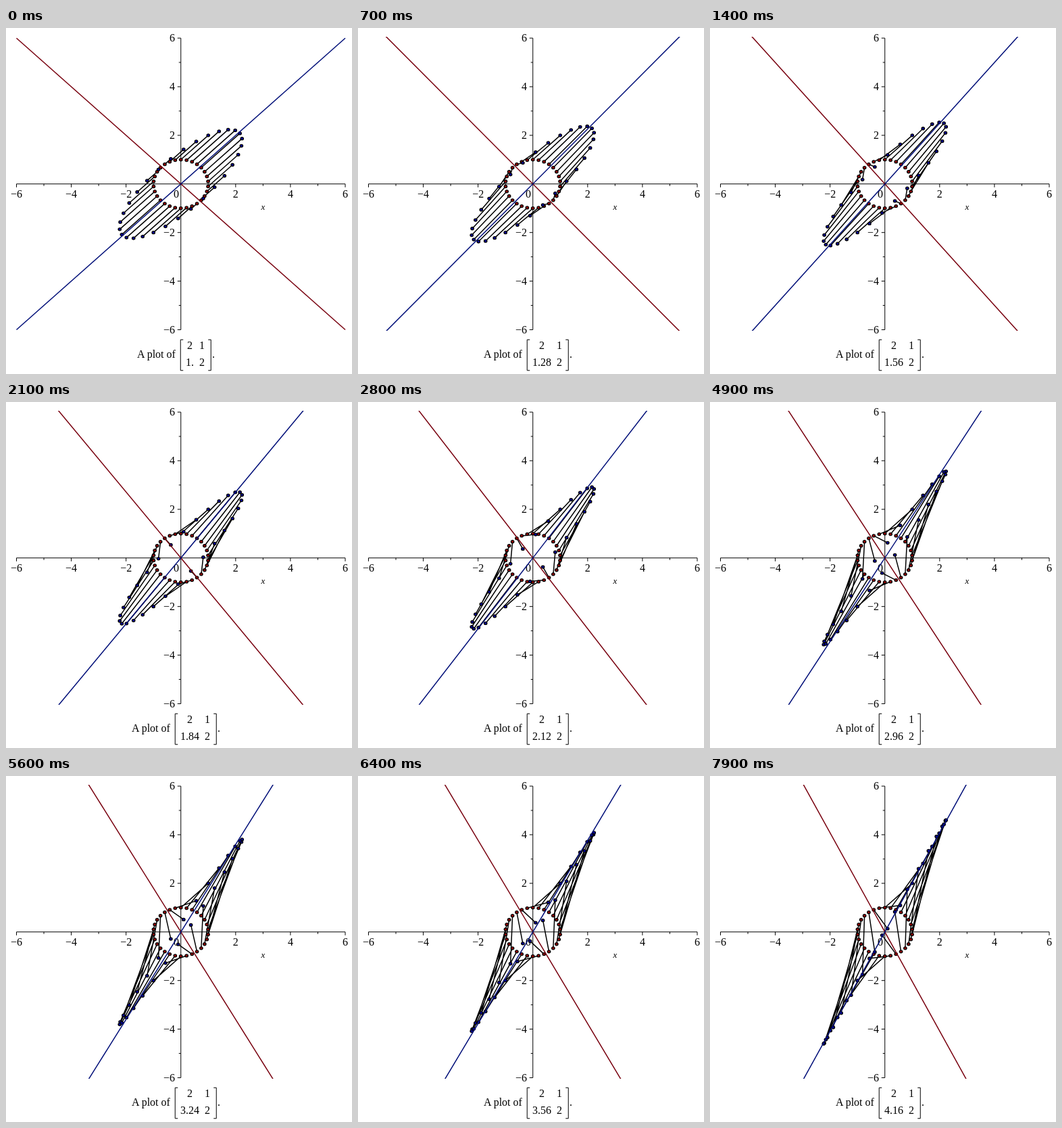
Recreate the animation shown at these times as an HTML page. Size 512x512 px, loop 8000 ms.

```html
<!DOCTYPE html>
<html lang="en">
<head>
<meta charset="utf-8">
<title>Matrix plot</title>
<style>
  html, body { margin: 0; width: 100%; height: 100%; overflow: hidden; background: #fff; }
  svg { display: block; width: 100vw; height: 100vh; }
  text { font: 16px "Liberation Serif", "Times New Roman", serif; fill: #000; }
  .mid { text-anchor: middle; }
  .end { text-anchor: end; }
  #name { font-size: 13px; font-style: italic; }
  #axes path, .bracket { fill: none; stroke: #000; stroke-width: 1; }
  #links { fill: none; stroke: #000; stroke-width: 1.5; }
  #dots ellipse { stroke: #000; stroke-width: 1.3; }
  .unit { fill: #a00000; }
  .image { fill: #0000a0; }
  #rays line { stroke-width: 1.5; }
</style>
</head>
<body>
<svg viewBox="0 0 512 512">
  <clipPath id="view"><rect x="15" y="13" width="488" height="435"/></clipPath>
  <g id="axes"><path id="ticks"/><text id="name" class="mid" x="380.5" y="269">x</text></g>
  <g clip-path="url(#view)">
    <path id="links"/>
    <g id="dots"></g>
    <g id="rays"><line id="red" stroke="#78000e"/><line id="blue" stroke="#000e78"/></g>
  </g>
  <text id="lead" y="487.5">A plot of</text>
  <path id="left" class="bracket" d="M4.25 461.25H.25V506.75H4.25"/>
  <text class="mid" x="272" y="475">2</text>
  <text id="entry" class="mid" x="272" y="500"></text>
  <text id="top" class="mid" y="475">1</text>
  <text id="bottom" class="mid" y="500">2</text>
  <path id="right" class="bracket" d="M-4.75 461.25H-.75V506.75H-4.75"/>
  <text id="stop" y="487.5">.</text>
</svg>
<script>
const $ = id => document.getElementById(id);
const px = x => 258.75 + 40.54 * x;
const py = y => 230.75 - 35.96 * y;

function set(el, attrs) {
  for (const key in attrs) el.setAttribute(key, attrs[key]);
}

function add(parent, tag, attrs, text = "") {
  const el = document.createElementNS("http://www.w3.org/2000/svg", tag);
  set(el, attrs);
  el.textContent = text;
  parent.append(el);
  return el;
}

function drawAxes() {
  let d = `M${px(-6)} ${py(0)}H${px(6)}M${px(0)} ${py(6)}V${py(-6)}`;
  for (let v = -6; v <= 6; v++) {
    const major = v % 2 === 0;
    const size = major ? 5 : 3;
    if (v) d += `M${px(v)} ${py(0)}v${size}M${px(0)} ${py(v)}h${-size}`;
    if (!major) continue;
    const label = String(v).replace("-", "\u2212");
    add($("axes"), "text", { class: "mid", x: v ? px(v) : 252, y: 251 }, label);
    if (v) add($("axes"), "text", { class: "end", x: 250, y: py(v) + 5.25 }, label);
  }
  $("ticks").setAttribute("d", d);
}

const units = Array.from({ length: 30 }, (_, k) => {
  const angle = (6 + 12 * k) * Math.PI / 180;
  return [Math.cos(angle), Math.sin(angle)];
});
const dot = (kind, x, y) =>
  add($("dots"), "ellipse", { class: kind, cx: px(x), cy: py(y), rx: 2.2, ry: 2 });

drawAxes();
units.forEach(([x, y]) => dot("unit", x, y));
const images = units.map(([x, y]) => dot("image", x, y));

function drawRay(id, slope) {
  set($(id), { x1: px(-6), y1: py(-6 * slope), x2: px(6), y2: py(6 * slope) });
}

function drawCaption(step, a) {
  const first = step === 0;
  const shift = first ? 8 : 0;
  const column = first ? 290 : 298;
  $("entry").textContent = first ? "1." : a.toFixed(2);
  set($("lead"), { x: 186 + shift });
  set($("left"), { transform: `translate(${250 + shift})` });
  set($("top"), { x: column });
  set($("bottom"), { x: column });
  set($("right"), { transform: `translate(${312 - shift})` });
  set($("stop"), { x: 313 - shift });
}

// Maps the unit circle through [[2, 1], [a, 2]]; its eigenvectors are (1, ±√a).
function draw(step) {
  const a = 1 + .04 * step;
  let d = "";
  units.forEach(([x, y], i) => {
    const cx = px(2 * x + y), cy = py(a * x + 2 * y);
    d += `M${px(x)} ${py(y)}L${cx} ${cy}`;
    set(images[i], { cx, cy });
  });
  $("links").setAttribute("d", d);
  drawRay("red", -Math.sqrt(a));
  drawRay("blue", Math.sqrt(a));
  drawCaption(step, a);
}

let shown = -1;
function tick() {
  const step = Math.floor(performance.now() % 8000 / 100);
  if (step !== shown) draw(shown = step);
  requestAnimationFrame(tick);
}
tick();
</script>
</body>
</html>
```
